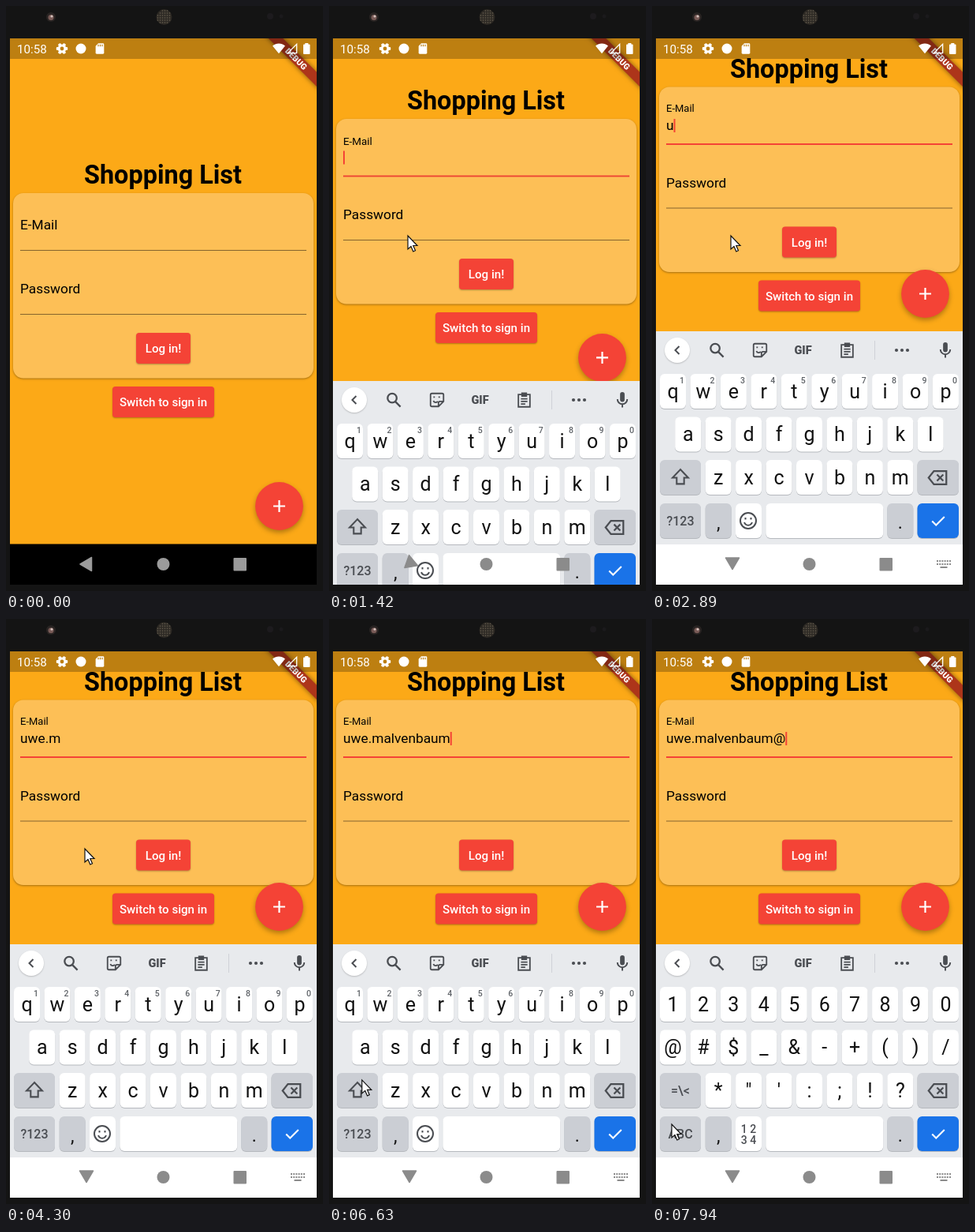
An HTML page with a canvas that plays this animation: 402 by 741 pixels, repeating every 8 s.

```html
<!DOCTYPE html>
<html lang="en">
<head>
<meta charset="utf-8">
<title>Shopping list login</title>
<style>
html, body { margin: 0; width: 100%; height: 100%; overflow: hidden; background: #141414; }
canvas { display: block; }
</style>
</head>
<body>
<canvas id="stage" width="402" height="741"></canvas>
<script>
const ctx = document.getElementById('stage').getContext('2d');
const LOOP = 8000, STEP = 68.6, TAU = Math.PI * 2;
const RED = '#f44336', INK = '#4a4d52';
const ADDRESS = 'uwe.malvenbaum@';
const KEY_TIMES = [2760, 2960, 3420, 3490, 3820, 4570, 4700,
  ...Array.from({ length: 7 }, (_, i) => 4900 + 120 * i), 7730];
const SYMBOLS_AT = 6920;
const POINTER = [[390, 263, 643], [750, 163, 460], [1010, 89, 280], [1150, 100, 291],
  [6080, 100, 291], [6630, 42, 583], [6840, 25, 655], [7120, 25, 652],
  [7400, 26, 545], [7730, 26, 545], [7936, 25, 640]];

const clamp = v => Math.max(0, Math.min(1, v));
const progress = (t, start, length) => clamp((t - start) / length);
const mix = (a, b, p) => a + (b - a) * p;

function box(x, y, w, h, r, fill) {
  ctx.fillStyle = fill;
  ctx.beginPath();
  ctx.roundRect(x, y, w, h, r);
  ctx.fill();
}

function disc(x, y, r, fill) {
  ctx.fillStyle = fill;
  ctx.beginPath();
  ctx.arc(x, y, r, 0, TAU);
  ctx.fill();
}

function text(s, x, y, size, fill = '#000', weight = 400, align = 'left') {
  ctx.font = `${weight} ${size}px Roboto, sans-serif`;
  ctx.textAlign = align;
  ctx.fillStyle = fill;
  ctx.fillText(s, x, y);
}

function withShadow(blur, dy, alpha, draw) {
  ctx.save();
  ctx.shadowColor = `rgba(0,0,0,${alpha})`;
  ctx.shadowBlur = blur;
  ctx.shadowOffsetY = dy;
  draw();
  ctx.restore();
}

// Icon paths live on a 24-unit grid, centred on (x, y).
function icon(path, x, y, size, { stroke, fill, width = 2 }) {
  const shape = new Path2D(path);
  ctx.save();
  ctx.translate(x - size / 2, y - size / 2);
  ctx.scale(size / 24, size / 24);
  ctx.lineWidth = width;
  if (fill) { ctx.fillStyle = fill; ctx.fill(shape); }
  if (stroke) { ctx.strokeStyle = stroke; ctx.stroke(shape); }
  ctx.restore();
}

const ICON = {
  back: 'M15 6L9 12L15 18',
  search: 'M14.5 14.5L21 21M16 9.5a6 6 0 1 1-12 0a6 6 0 1 1 12 0',
  sticker: 'M5 3H19a2 2 0 0 1 2 2V14L14 21H5a2 2 0 0 1-2-2V5a2 2 0 0 1 2-2ZM21 14h-5a2 2 0 0 0-2 2v5M7 13c1 3 4 3 6 1M8 7v2M15 7v2',
  clipboard: 'M4 4.5H20V21.5H4ZM9 2.5h6v4H9ZM7.5 10.5h9M7.5 14h9M7.5 17.5h6',
  micBody: 'M12 1.5a3 3 0 0 1 3 3v7a3 3 0 0 1-6 0V4.500a3 3 0 0 1 3-3Z',
  micStand: 'M5.500 11a6.500 6.500 0 0 0 13 0M12 18v4',
  shift: 'M12 2.5L2.500 12.500H7.500V20H16.500V12.500H21.500Z',
  erase: 'M8 4.5H22V19.500H8L2 12ZM11.500 8.500l7 7M18.500 8.500l-7 7',
  smile: 'M22 12a10 10 0 1 1-20 0a10 10 0 1 1 20 0M7 14c2 5 8 5 10 0M8.500 8v2.500M15.500 8v2.500',
  check: 'M3.500 12.500L9 18L20.500 6.500',
  plus: 'M12 4.500V19.500M4.500 12H19.500',
  sdCard: 'M9 2H18a2 2 0 0 1 2 2V20a2 2 0 0 1-2 2H6a2 2 0 0 1-2-2V7Z',
  wifi: 'M12 22L0 7.500C7 1.500 17 1.500 24 7.500Z',
  signal: 'M3 21L21 3V21Z',
  arrow: 'M0 0V17L4 13.500L6.800 20L9.500 18.800L6.800 12.500H12Z'
};

function bezel() {
  box(0, 0, 402, 741, 0, '#141414');
  disc(57, 14, 6, '#292423');
  disc(57, 14.5, 3.5, '#795b57');
  disc(58, 13, 1.6, '#d4c2bd');
  disc(200.5, 14, 10, '#2d2924');
  for (let y = -8; y <= 8; y += 3)
    for (let x = -8; x <= 8; x += 3)
      if (x * x + y * y < 82) disc(200.5 + x, 14 + y, 0.9, '#575044');
  disc(335, 13, 4, '#1d1b1e');
  disc(349, 13, 2.5, '#1b1a1c');
}

function button(label, x, y, w, baseline) {
  withShadow(2, 1, 0.3, () => box(x, y, w, 39, 4, RED));
  text(label, x + w / 2, baseline, 15.1, '#fff', 500, 'center');
}

function caretOn(t) {
  const last = KEY_TIMES.filter(k => k <= t).pop() ?? 1750;
  return t < last || Math.floor((t - last) / 480) % 2 === 0;
}

function app(t, frame, inset) {
  const focus = progress(frame, 1225, 215);
  const typed = ADDRESS.slice(0, KEY_TIMES.filter(k => k <= t).length);
  box(5, 41, 389, 641, 0, '#fca917');
  ctx.save();
  ctx.translate(0, -inset / 2);
  text('Shopping List', 199, 225, 32.4, '#000', 700, 'center');
  withShadow(2.5, 1, 0.35, () => box(9, 237, 381, 234.5, 13, '#fdbf56'));

  text('E-Mail', 18, mix(283, 268.5, focus), mix(17.3, 13, focus));
  text(typed, 18, 291.5, 17.3);
  const caretX = 18 + ctx.measureText(typed).width;
  box(18, 309, 363, 1, 0, 'rgba(0,0,0,.48)');
  ctx.globalAlpha = focus;
  box(18, 308.5, 363, 2, 0, RED);
  ctx.globalAlpha = clamp(focus * 2);
  if (focus && caretOn(t)) box(caretX, 277.5, 2, 17, 0, RED);
  ctx.globalAlpha = 1;

  text('Password', 18, 364, 17.3);
  box(18, 390, 363, 1, 0, 'rgba(0,0,0,.48)');
  button('Log in!', 165, 414, 69, 439);
  button('Switch to sign in', 135, 482, 129, 507);
  ctx.restore();

  const fabY = 633.5 - inset;
  withShadow(6, 3, 0.3, () => disc(346.5, fabY, 30.4, RED));
  icon(ICON.plus, 346.5, fabY, 24, { stroke: '#fff', width: 2.2 });
}

function debugBanner() {
  ctx.save();
  ctx.translate(394, 41);
  ctx.rotate(Math.PI / 4);
  withShadow(6, 0, 0.5, () => box(-50, 30.3, 100, 12.9, 0, '#ad351a'));
  text('DEBUG', 0, 40.6, 10.6, '#fff', 900, 'center');
  ctx.restore();
}

function statusBar() {
  box(5, 41, 389, 26, 0, 'rgba(0,0,0,.25)');
  text('10:58', 14, 60, 15.2, '#fff');
  for (let i = 0; i < 6; i++) {
    ctx.save();
    ctx.translate(71, 54);
    ctx.rotate(i * TAU / 6 + TAU / 12);
    box(-1.9, -7.2, 3.8, 5, 1, '#fff');
    ctx.restore();
  }
  disc(71, 54, 5.4, '#fff');
  disc(71, 54, 2.4, '#bd7f11');
  disc(95, 54, 6.5, '#fff');
  icon(ICON.sdCard, 119, 54, 16, { fill: '#fff' });
  for (const x of [117, 119.5, 122]) box(x - 0.6, 48.7, 1.2, 2.6, 0, '#bd7f11');
  icon(ICON.wifi, 346, 53.5, 16, { fill: '#fff' });
  icon(ICON.signal, 363, 54, 15, { stroke: '#fff', width: 2.2 });
  box(377, 48.500, 8.500, 12.500, 1, '#fff');
  box(379.3, 47, 4, 2, 0, '#fff');
}

const keyX = i => 10 + 38.44 * i;

function key(x, y, w, label, { fill = '#fff', size = 25, weight = 400, color = '#111', dy = 8.5 } = {}) {
  box(x, y + 1, w, 44, 6, '#b6b9be');
  box(x, y, w, 44, 6, fill);
  if (label) text(label, x + w / 2, y + 22 + dy, size, color, weight, 'center');
}

function toolbar() {
  const line = { stroke: INK, width: 2.4 };
  withShadow(2, 1, 0.2, () => disc(32, 436, 16, '#fff'));
  icon(ICON.back, 32, 436, 20, line);
  icon(ICON.search, 82, 436, 23, line);
  icon(ICON.sticker, 137, 436, 22, { stroke: INK });
  text('GIF', 191.5, 441, 14.5, INK, 900, 'center');
  icon(ICON.clipboard, 247.5, 436, 22, { stroke: INK });
  box(282, 424, 1, 24, 0, '#cfd2d7');
  for (const x of [310, 317, 324]) disc(x, 436, 2.1, INK);
  icon(ICON.micBody, 372, 436, 23, { fill: INK });
  icon(ICON.micStand, 372, 436, 23, { stroke: INK });
}

function keyboard(offset, symbols) {
  const rows = symbols ? ['1234567890', '@#$_&-+()/', '*"\':;!?'] : ['qwertyuiop', 'asdfghjkl', 'zxcvbnm'];
  const grey = { fill: '#cbced4' };
  const word = { ...grey, size: 16, weight: 500, color: INK, dy: 6 };
  ctx.save();
  ctx.translate(0, offset);
  box(5, 412, 389, 270, 0, '#e8eaed');
  box(5, 682, 389, 51, 0, '#fff');
  toolbar();

  [...rows[0]].forEach((c, i) => {
    key(keyX(i), 466, 33, c);
    if (!symbols) text((i + 1) % 10, keyX(i) + 28, 478, 10.5, '#5f6368', 500, 'center');
  });
  [...rows[1]].forEach((c, i) => key(keyX(i) + (symbols ? 0 : 19.2), 520.5, 33, c));
  [...rows[2]].forEach((c, i) => key(keyX(i + 1.5), 575, 33, c));

  key(10, 575, 52, symbols ? '=\\<' : '', word);
  if (!symbols) icon(ICON.shift, 36, 597, 25, { stroke: INK });
  key(336.5, 575, 52.5, '', grey);
  icon(ICON.erase, 362, 597.5, 27, { stroke: INK });

  key(10, 630, 52, symbols ? 'ABC' : '?123', word);
  key(67.7, 630, 33, ',', { ...grey, size: 23, dy: 11 });
  key(106, 630, 33, '');
  if (symbols) {
    text('1 2', 122.5, 651, 14, INK, 500, 'center');
    text('3 4', 122.5, 665, 14, INK, 500, 'center');
  } else icon(ICON.smile, 122, 652, 24, { stroke: INK });
  key(144.3, 630, 149, '');
  key(298.3, 630, 33, '.', { ...grey, size: 23, dy: 10 });
  key(336.5, 630, 52.5, '', { fill: '#1a73e8' });
  icon(ICON.check, 363, 652, 22, { stroke: '#fff', width: 2.3 });
  ctx.restore();
}

function navIcons(frame) {
  const turn = progress(frame, 1330, 200);
  const color = turn ? '#8b8b8b' : '#9b9b9b';
  ctx.save();
  ctx.translate(102, mix(707, 705.5, turn));
  ctx.rotate(-turn * Math.PI / 2);
  ctx.fillStyle = ctx.strokeStyle = color;
  ctx.lineJoin = 'round';
  ctx.lineWidth = 1.5;
  ctx.beginPath();
  ctx.moveTo(-8, 0);
  ctx.lineTo(6.5, -8.5);
  ctx.lineTo(6.5, 8.5);
  ctx.closePath();
  ctx.fill();
  ctx.stroke();
  ctx.restore();
  disc(199.5, 707, 8, color);
  box(288.5, 699, 16.5, 16.5, 1, color);
  if (frame < 1270 || (frame > 1340 && frame < 1500)) return;
  for (let i = 0; i < 6; i++)
    for (const y of [702, 706]) box(361 + 3.2 * i, y, 2, 2, 0, color);
  box(365.5, 710, 9, 2, 0, color);
}

function pointer(frame) {
  if (frame < POINTER[0][0]) return;
  const next = POINTER.findIndex(p => p[0] > frame);
  const b = POINTER[next < 0 ? POINTER.length - 1 : next];
  const a = next < 0 ? b : POINTER[next - 1];
  const p = progress(frame, a[0], b[0] - a[0] || 1);
  ctx.save();
  ctx.translate(mix(a[1], b[1], p), mix(a[2], b[2], p));
  const shape = new Path2D(ICON.arrow);
  ctx.fillStyle = '#fff';
  ctx.strokeStyle = '#111';
  ctx.lineWidth = 1.2;
  ctx.fill(shape);
  ctx.stroke(shape);
  ctx.restore();
}

function draw(t) {
  const frame = Math.max(0, 390 + Math.floor((t - 380) / STEP) * STEP);
  const inset = 269 * (1 - (1 - progress(frame, 1300, 400)) ** 3.4);
  const slide = 321 * (1 - progress(frame, 1300, 330)) ** 3.64;
  bezel();
  ctx.save();
  ctx.beginPath();
  ctx.rect(5, 41, 389, 692);
  ctx.clip();
  app(t, frame, inset);
  debugBanner();
  statusBar();
  box(5, 681.5, 389, 51.5, 0, '#000');
  if (frame > 1300) keyboard(slide, t >= SYMBOLS_AT);
  navIcons(frame);
  ctx.restore();
  pointer(frame);
}

function tick() {
  draw(performance.now() % LOOP);
  requestAnimationFrame(tick);
}
tick();
</script>
</body>
</html>
```
